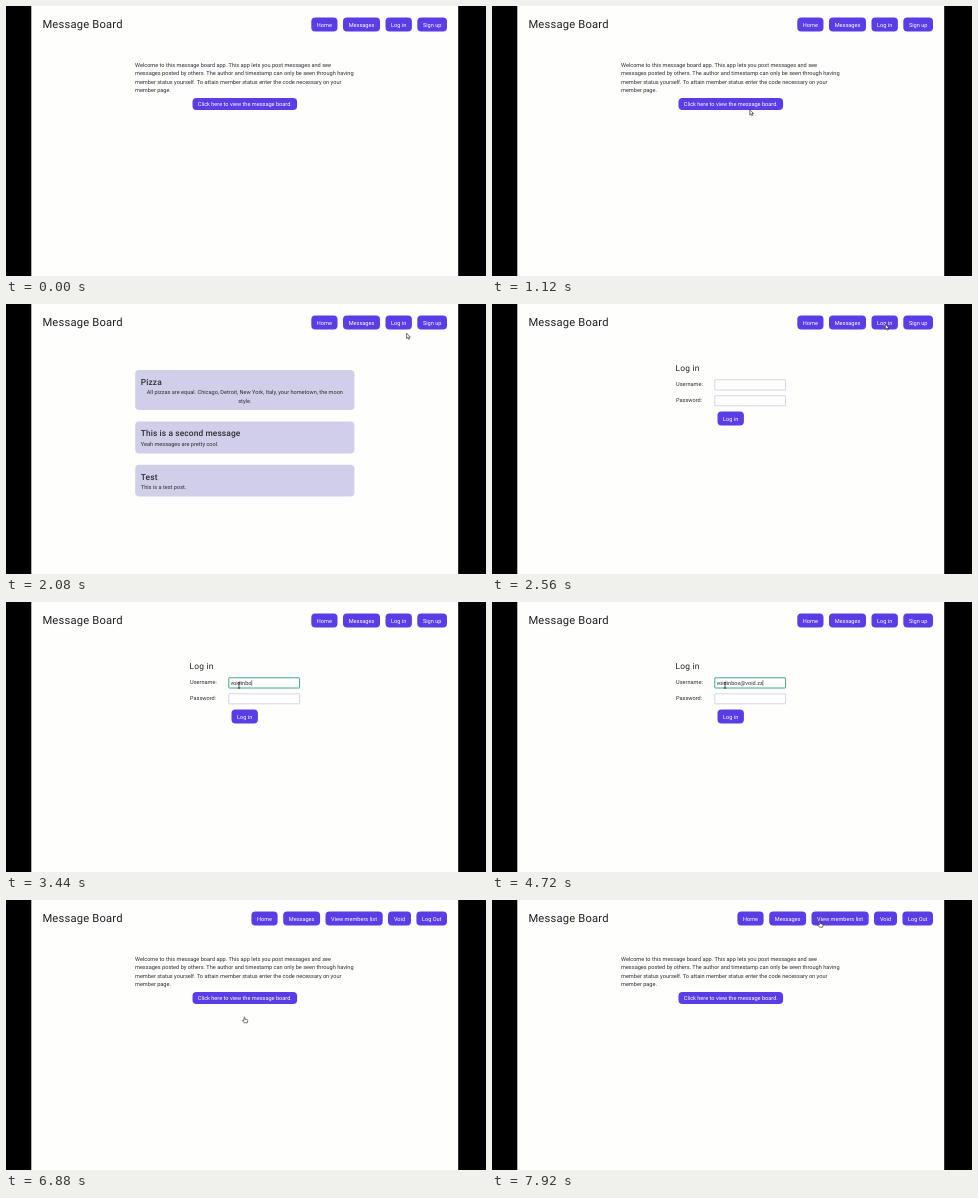
Animation of 480 by 270 pixels, one loop 8 s. Source, as an HTML page:

```html
<!DOCTYPE html>
<html lang="en">
<head>
<meta charset="utf-8">
<title>Message Board</title>
<style>
  html, body { margin: 0; width: 100%; height: 100%; overflow: hidden; background: #000; }
  svg { display: block; width: 100vw; height: 100vh; }
  text { font: 5.6px Roboto, sans-serif; fill: #2d2d33; text-rendering: geometricPrecision; white-space: pre; }
  .brand { font-size: 11.2px; letter-spacing: .2px; fill: #202024; }
  .heading { font-size: 8.4px; letter-spacing: .2px; fill: #202024; }
  .card-title { font-size: 8.4px; font-weight: 500; letter-spacing: .1px; }
  .mid { text-anchor: middle; }
  .btn rect { fill: #5b3de6; }
  .btn text { fill: #fff; text-anchor: middle; }
  .card { fill: #d0cee9; }
  .field { fill: #fff; stroke: #bab8d2; stroke-width: .6; }
  .field.focus { stroke: #45a48c; stroke-width: 1; }
  .caret { stroke: #222; stroke-width: .55; }
  #dots { stroke: #333; stroke-width: 1.05; stroke-linecap: round; stroke-dasharray: 0 1.88; }
  .pointer { fill: #fff; stroke: #2a2a2e; stroke-width: .65; stroke-linejoin: round; }
  #beam { fill: none; stroke: #222; stroke-width: .75; }
</style>
</head>
<body>
<svg viewBox="0 0 480 270" preserveAspectRatio="none">
  <rect width="480" height="270"/>
  <rect x="25.3" width="426.9" height="270" fill="#fefefc"/>
  <text class="brand" x="36.4" y="22.2">Message Board</text>
  <g id="guestNav"></g>
  <g id="memberNav"></g>

  <g id="home">
    <text x="129" y="61">Welcome to this message board app. This app lets you post messages and see</text>
    <text x="129" y="69.4">messages posted by others. The author and timestamp can only be seen through having</text>
    <text x="129" y="77.8">member status yourself. To attain member status enter the code necessary on your</text>
    <text x="129" y="86.2">member page.</text>
  </g>

  <g id="board">
    <rect class="card" x="129.2" y="66" width="219.2" height="40" rx="4"/>
    <text class="card-title" x="134.8" y="80.8">Pizza</text>
    <text class="mid" x="238.8" y="90.1">All pizzas are equal. Chicago, Detroit, New York, Italy, your hometown, the moon</text>
    <text class="mid" x="238.8" y="98.5">style.</text>
    <rect class="card" x="129.2" y="117.6" width="219.2" height="31.8" rx="4"/>
    <text class="card-title" x="134.8" y="132.3">This is a second message</text>
    <text x="134.8" y="141.7">Yeah messages are pretty cool.</text>
    <rect class="card" x="129.2" y="160.8" width="219.2" height="31.8" rx="4"/>
    <text class="card-title" x="134.8" y="175.5">Test</text>
    <text x="134.8" y="184.9">This is a test post.</text>
  </g>

  <g id="login">
    <text class="heading" x="183.6" y="67">Log in</text>
    <text x="184" y="81.8">Username:</text>
    <text x="184" y="97.8">Password:</text>
    <rect id="userField" class="field" x="222.8" y="75.8" width="70.8" height="10.2" rx=".4"/>
    <rect id="passField" class="field" x="222.8" y="91.8" width="70.8" height="10" rx=".4"/>
    <text id="user" x="224.4" y="82.9"></text>
    <path id="dots" d=""/>
    <path id="caret" class="caret" d=""/>
  </g>

  <g id="cursor">
    <path id="arrow" class="pointer" d="M0 0V5.3L1.2 4.2L2 6.1L2.9 5.7L2.1 3.9H3.7Z"/>
    <path id="hand" class="pointer" d="M-.5 .4Q0 -.4 .5 .4V2.2L2.9 2.8Q3.4 3 3.2 3.8L2.8 5.8H-.3L-2 3.6Q-1.8 2.8 -.5 3.6Z"/>
    <path id="beam" d="M-1.2 -2.7H1.2M0 -2.7V2.7M-1.2 2.7H1.2"/>
  </g>
</svg>
<script>
const LOOP = 8000;
const ADDRESS = "voidinbox@void.zz";
const $ = id => document.getElementById(id);

function addButton(parent, label, x, y, w, h) {
  const mid = x + w / 2, base = y + h / 2 + 2;
  $(parent).insertAdjacentHTML("beforeend",
    `<g class="btn"><rect x="${x}" y="${y}" width="${w}" height="${h}" rx="4"/>` +
    `<text x="${mid}" y="${base}">${label}</text></g>`);
}

const navs = {
  guestNav: [["Home", 305.3, 26.2], ["Messages", 337, 37], ["Log in", 379.5, 26.4], ["Sign up", 411.3, 29.7]],
  memberNav: [["Home", 245.4, 26.2], ["Messages", 277.2, 36.9], ["View members list", 319.5, 57.2],
              ["Void", 382, 23], ["Log Out", 410.4, 30.6]]
};
for (const [nav, items] of Object.entries(navs))
  for (const [label, x, w] of items) addButton(nav, label, x, 11.5, w, 14);
addButton("home", "Click here to view the message board.", 186.5, 92, 104.6, 12.1);
addButton("login", "Log in", 225.5, 107.5, 26.4, 14);

// [time, value] lists: the last entry reached is current
const pages = [[0, "home"], [1480, "board"], [2480, "login"], [6880, "home"]];
const shapes = [[0, ""], [240, "arrow"], [1200, "hand"], [1520, "arrow"], [2160, "hand"],
                [2560, "arrow"], [2800, "beam"], [6400, "arrow"], [6520, "hand"],
                [6960, "arrow"], [7760, "hand"]];
// [time, x, y] of the pointer's hot spot
const path = [[240, 296, 166], [960, 257.8, 103.6], [1160, 257.8, 103.6], [1300, 254, 99],
              [1560, 254, 99], [2040, 400.6, 29.2], [2100, 400.6, 29.2], [2240, 395, 19.5],
              [2540, 395, 19.5], [2880, 233, 83.4], [6320, 233, 83.4], [6600, 238.5, 117],
              [6940, 238.5, 117], [7840, 327.8, 21.4], [8000, 327.8, 21.4]];
// [start, ms per key, keys]
const userKeys = [[3030, 56, 9], [3760, 80, 1], [4020, 98, 7]];
const passKeys = [[5180, 80, 12]];

const current = (list, t) => list.filter(e => e[0] <= t).pop()[1];
const show = (id, on) => { $(id).style.display = on ? "" : "none"; };
const typed = (bursts, t) => bursts.reduce((n, [start, step, keys]) =>
  n + (t < start ? 0 : Math.min(keys, 1 + Math.floor((t - start) / step))), 0);

function pointAt(t) {
  const i = path.findIndex(p => p[0] > t);
  if (i < 1) return path[0].slice(1);
  const [t0, x0, y0] = path[i - 1], [t1, x1, y1] = path[i];
  const u = (t - t0) / (t1 - t0), k = u * u * (3 - 2 * u);
  return [x0 + (x1 - x0) * k, y0 + (y1 - y0) * k];
}

function drawForm(t) {
  const inUser = t >= 2920 && t < 5040, inPass = t >= 5040;
  $("userField").classList.toggle("focus", inUser);
  $("passField").classList.toggle("focus", inPass);
  const user = $("user"), count = typed(passKeys, t);
  user.textContent = ADDRESS.slice(0, typed(userKeys, t));
  $("dots").setAttribute("d", count ? `M225.2 96.9h${(count - 1) * 1.88 + .01}` : "");
  const x = inUser ? 224.6 + user.getComputedTextLength() : 224.6 + count * 1.88;
  $("caret").setAttribute("d", inUser || inPass ? `M${x} ${inUser ? 78.2 : 94.2}v5.6` : "");
}

function draw(t) {
  const page = current(pages, t), shape = current(shapes, t), member = t >= 6880;
  for (const id of ["home", "board", "login"]) show(id, id === page);
  for (const id of ["arrow", "hand", "beam"]) show(id, id === shape);
  show("guestNav", !member);
  show("memberNav", member);
  if (page === "login") drawForm(t);
  $("cursor").setAttribute("transform", `translate(${pointAt(t)})`);
}

let start;
function tick(now) {
  start ??= now;
  draw((now - start) % LOOP);
  requestAnimationFrame(tick);
}
draw(0);
requestAnimationFrame(tick);
</script>
</body>
</html>
```
